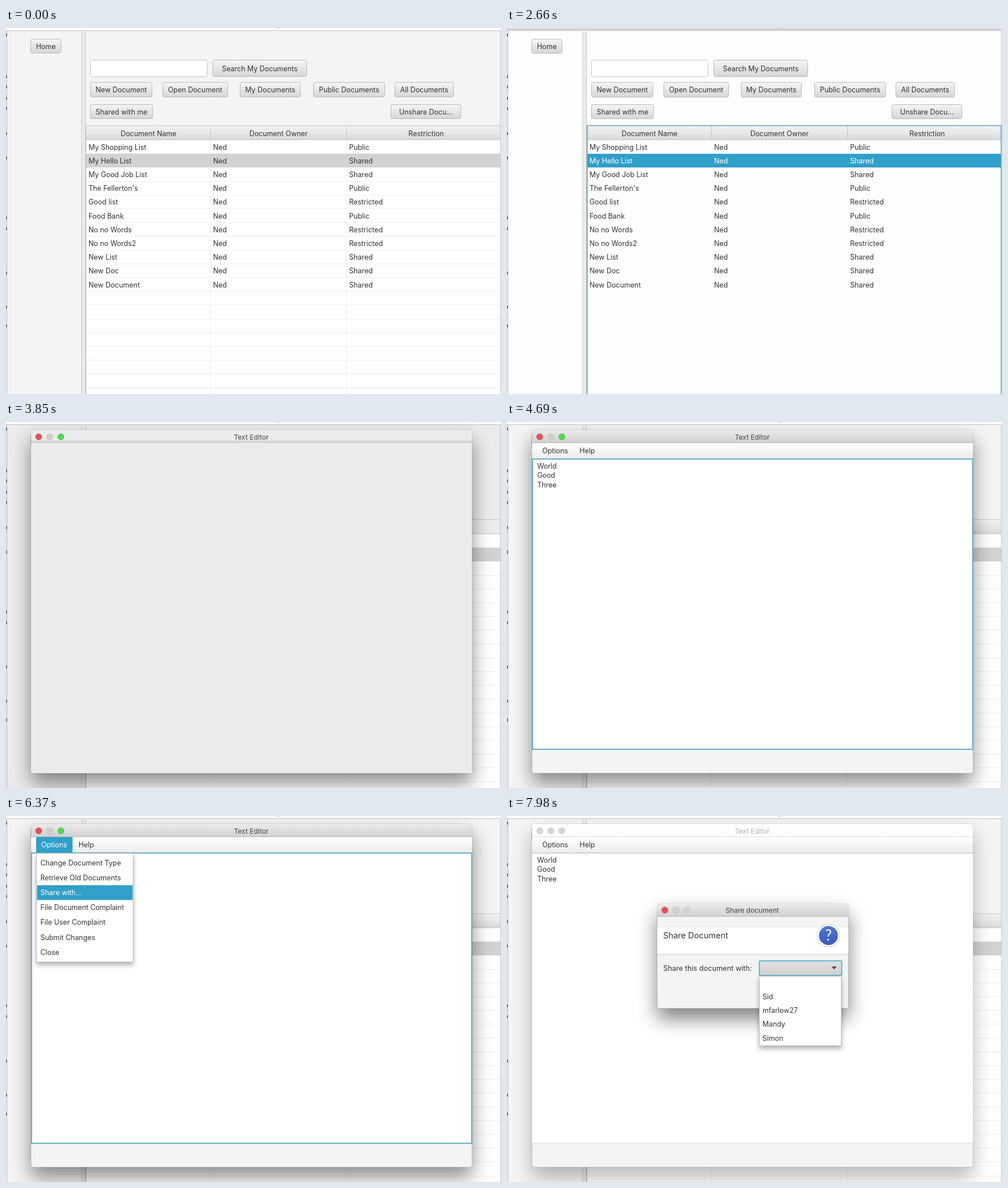
Animation, 870 px wide and 643 px high, one loop 8 s. Source, as an HTML page:

```html
<!DOCTYPE html>
<html lang="en">
<head>
<meta charset="utf-8">
<title>Sharing a document</title>
<style>
  html, body { margin: 0; width: 100%; height: 100%; overflow: hidden; background: #f4f4f4; }
  svg { display: block; width: 100%; height: 100%; }
  text { font-family: Inter, Roboto, sans-serif; font-size: 12.4px; fill: #333; white-space: pre; }
  .title { font-size: 12.1px; fill: #444; }
  .heading { font-size: 14.5px; }
  .prompt { font-size: 12.7px; }
  .white text, text.white { fill: #fff; }
  #selected text { fill: inherit; }
  .window { transform-box: fill-box; transform-origin: center; }
</style>
</head>
<body>
<svg id="stage" viewBox="0 0 870 643" preserveAspectRatio="none"></svg>
<script>
const LOOP = 8000;
const BLUE = '#309fc9';

// Moments of the story, in ms
const T = {
  focus: 2310, editor: 3480, content: 3900,
  menu: 5320, hover: [5600, 5780, 5950], menuClose: 6400,
  dialog: 6500, dialogContent: 6760, dropdown: 7500
};

// Drawing helpers
const rect = (x, y, w, h, fill, extra = '') =>
  `<rect x="${x}" y="${y}" width="${w}" height="${h}" fill="${fill}" ${extra}/>`;
const line = (x1, y1, x2, y2, color, width = 1) =>
  `<path d="M${x1} ${y1}L${x2} ${y2}" stroke="${color}" stroke-width="${width}"/>`;
const label = (x, middle, text, cls = '', anchor = 'start') =>
  `<text x="${x}" y="${middle + 4.5}" class="${cls}" text-anchor="${anchor}">${text}</text>`;
const centered = (x, middle, text, cls) => label(x, middle, text, cls, 'middle');
const group = (id, content, cls = '') => `<g id="${id}" class="${cls}">${content}</g>`;
const button = (x, y, w, h, text) =>
  rect(x + 1, y + 1.5, w - 1, h, '#fff', 'rx="3"') +
  rect(x + .5, y + .5, w - 1, h - 1, 'url(#button)', 'rx="3" stroke="#b9b9b9"') +
  centered(x + w / 2, y + h / 2, text);
const lights = (x, y, colors) => colors.map((color, i) =>
  `<circle cx="${x + i * 19.5}" cy="${y}" r="5.8" fill="${color}" stroke="#000" stroke-opacity=".08"/>`).join('');
const shadow = (id, x, y, w, h, opacity) =>
  rect(x, y + 18, w, h, '#000', `id="${id}" rx="6" opacity="${opacity}" filter="url(#blur)"`);
const popup = (x, y, w, h) =>
  rect(x, y + 5, w, h, '#000', 'opacity=".3" filter="url(#softBlur)"') +
  rect(x + .5, y + .5, w - 1, h - 1, '#fff', 'stroke="#bcbcbc"');
const topRounded = (x, y, w, h, r) =>
  `M${x} ${y + h}V${y + r}q0 ${-r} ${r} ${-r}H${x + w - r}q${r} 0 ${r} ${r}V${y + h}z`;
const gradient = (id, ...colors) =>
  `<linearGradient id="${id}" x2="0" y2="1">${colors.map((color, i) =>
    `<stop offset="${i / (colors.length - 1)}" stop-color="${color}"/>`).join('')}</linearGradient>`;

const defs = `<defs>
  ${gradient('button', '#f5f5f5', '#e6e6e6', '#d6d6d6')}
  ${gradient('header', '#f1f1f1', '#e8e8e8', '#d9d9d9')}
  ${gradient('bar', '#ebebeb', '#d1d1d1')}
  ${gradient('menuBar', '#ffffff', '#ececec')}
  ${gradient('combo', '#e2e2e2', '#cfcfcf')}
  ${gradient('badge', '#4f74cf', '#3c5cbd')}
  <filter id="blur" x="-30%" y="-40%" width="160%" height="180%"><feGaussianBlur stdDeviation="17"/></filter>
  <filter id="softBlur" x="-20%" y="-20%" width="140%" height="140%"><feGaussianBlur stdDeviation="4"/></filter>
</defs>`;

// Document list
const ROW = 24.2, ROWS_TOP = 197;
const documents = [
  ['My Shopping List', 'Public'], ['My Hello List', 'Shared'], ['My Good Job List', 'Shared'],
  ["The Fellerton's", 'Public'], ['Good list', 'Restricted'], ['Food Bank', 'Public'],
  ['No no Words', 'Restricted'], ['No no Words2', 'Restricted'], ['New List', 'Shared'],
  ['New Doc', 'Shared'], ['New Document', 'Shared']
];

function documentRow([name, access], i) {
  const y = 209 + i * ROW;
  const cells = label(145, y, name) + label(364, y, 'Ned') + label(603, y, access);
  return i === 1 ? group('selected', cells) : cells;
}

function listWindow() {
  const dividers = Array.from({ length: 19 }, (_, i) => {
    const y = Math.round(ROWS_TOP + i * ROW) - .5;
    return i ? line(141, y, 869, y, '#ededed') : '';
  }).join('');
  const edgeMarks = [12, 85, 103, 123, 141, 185, 228, 333, 352, 430, 490, 523]
    .map(y => rect(0, y - 2, 1.5, 5, '#555')).join('');
  const header = rect(141, 171, 728, 25.5, 'url(#header)') +
    line(359.5, 171, 359.5, 196, '#c4c4c4') + line(598.5, 171, 598.5, 196, '#c4c4c4') +
    centered(250.5, 185, 'Document Name') + centered(479, 185, 'Document Owner') +
    centered(738.5, 185, 'Restriction');
  return rect(0, 0, 870, 643, '#f4f4f4', 'id="backdrop"') +
    rect(0, 0, 870, 4, '#fdfdfd', 'id="topStrip"') +
    line(0, 4.5, 870, 4.5, '#c2c2c2') + rect(477, 0, 3, 1, '#aaa') +
    line(1.5, 4, 1.5, 643, '#b4b4b4') + edgeMarks +
    rect(133, 6, 7, 637, '#ececec') +
    line(133, 6, 133, 643, '#c6c6c6') + line(139.5, 6, 139.5, 643, '#c0c0c0') +
    button(43, 19, 54, 26, 'Home') +
    rect(148.5, 56.5, 205, 29, '#fff', 'rx="3" stroke="#c4c4c4"') +
    button(363, 56, 166, 30, 'Search My Documents') +
    button(148, 95, 109, 27, 'New Document') +
    button(275, 95, 115, 27, 'Open Document') +
    button(411, 95, 107, 27, 'My Documents') +
    button(540, 95, 126, 27, 'Public Documents') +
    button(683, 95, 104, 27, 'All Documents') +
    button(148, 134, 110, 26, 'Shared with me') +
    button(676, 134, 124, 26, 'Unshare Docu...') +
    rect(141, 197, 728, 446, '#fff', 'id="table"') +
    group('grid', dividers + line(359.5, 197, 359.5, 643, '#f0f0f0') + line(598.5, 197, 598.5, 643, '#f0f0f0')) +
    group('tableHeader', header) +
    line(141, 171.5, 869, 171.5, '#c8c8c8') + line(141, 196.5, 869, 196.5, '#c8c8c8') +
    rect(141, 221, 728, 24, '#d2d2d2', 'id="highlight"') +
    documents.map(documentRow).join('') +
    line(140.5, 171, 140.5, 643, '#c8c8c8') + line(869, 4, 869, 643, '#c0c0c0') +
    group('tableFocus', rect(141, 171.5, 727.5, 480, 'none', 'stroke="#62a8c6" stroke-width="1.6"'));
}

// Text editor
const menuItems = ['Change Document Type', 'Retrieve Old Documents', 'Share with...',
  'File Document Complaint', 'File User Complaint', 'Submit Changes', 'Close'];
const menuY = i => 82 + i * 26.2;

function editorWindow() {
  const bar = topRounded(44, 14, 775, 22, 5);
  const active = `<path d="${bar}" fill="url(#bar)"/>` + line(44, 36.5, 819, 36.5, '#b8b8b8') +
    lights(57.5, 26, ['#e1525a', '#cfcfcf', '#52d64d']) + centered(431, 26, 'Text Editor', 'title');
  const inactive = `<path d="${bar}" fill="#fdfdfd"/>` + line(44, 36.5, 819, 36.5, '#dcdcdc') +
    lights(57.5, 26, ['#d6d6d6', '#d6d6d6', '#d6d6d6']) +
    `<g opacity=".4">${centered(431, 26, 'Text Editor', 'title')}</g>`;
  const blank = `<path d="${bar}" fill="#ebebeb"/>` + rect(44, 36, 775, 581, '#ebebeb', 'rx="3"') +
    rect(44, 32.5, 775, 2.5, '#d8d8d8') + line(44, 36, 819, 36, '#bdbdbd') +
    lights(57.5, 26, ['#e1525a', '#cfcfcf', '#52d64d']) + centered(431, 26, 'Text Editor', 'title');
  const content = rect(44, 37, 775, 27, 'url(#menuBar)') +
    label(62, 50, 'Options') + label(127.5, 50, 'Help') +
    rect(44, 64, 775, 512, '#fff') + line(44, 65, 819, 65, '#a9a9a9') + line(44, 575, 819, 575, '#cfcfcf') +
    ['World', 'Good', 'Three'].map((word, i) => label(53, 77 + i * 16.6, word)).join('') +
    group('editorFocus', rect(45, 65, 773.5, 510, 'none', 'stroke="#58a9c7" stroke-width="1.8"'));
  const menu = rect(53, 37, 64, 27, BLUE) + label(62, 50, 'Options', 'white') + popup(53, 65, 171, 192) +
    menuItems.map((item, i) => label(60.5, menuY(i), item)).join('') +
    T.hover.map((_, i) => group('hover' + i,
      rect(54.5, menuY(i) - 12.8, 168, 26, BLUE) + label(60.5, menuY(i), menuItems[i], 'white'))).join('');
  return group('editor',
    shadow('editorShadow', 44, 14, 775, 603, .45) +
    rect(44, 14, 775, 603, '#f4f4f4', 'rx="4" stroke="#000" stroke-opacity=".15"') +
    group('activeBar', active) + group('inactiveBar', inactive) +
    group('editorContent', content) + group('blankEditor', blank) + group('menu', menu), 'window');
}

// Share dialog
function shareDialog() {
  const content = rect(264, 196, 336, 47, '#fff') + line(264, 243, 600, 243, '#cbcbcb') +
    label(274.5, 210.5, 'Share Document', 'heading') +
    '<circle cx="565" cy="210" r="20" fill="#fff" stroke="#c9c9c9"/>' +
    '<circle cx="565" cy="210" r="16.7" fill="url(#badge)"/>' +
    '<text x="565" y="219" class="white" text-anchor="middle" style="font:26px Lato,sans-serif">?</text>' +
    label(274.5, 267, 'Share this document with:', 'prompt') +
    button(446, 300, 66, 26, 'Cancel') + button(522, 300, 66, 26, 'OK') +
    rect(443.5, 254.5, 145, 26, 'url(#combo)', 'rx="2.5" stroke="#55b3d0" stroke-width="1.8"') +
    '<path d="M570.5 264.5h9l-4.5 5z" fill="#444"/>';
  const names = ['Sid', 'mfarlow27', 'Mandy', 'Simon'];
  const dropdown = popup(443, 281, 145, 123) +
    names.map((name, i) => label(449, 317.5 + i * 24.2, name)).join('');
  return group('dialog',
    shadow('dialogShadow', 264, 154, 336, 184, .5) +
    rect(264, 154, 336, 184, '#f4f4f4', 'rx="4" stroke="#000" stroke-opacity=".15"') +
    `<path d="${topRounded(264, 154, 336, 22, 5)}" fill="url(#bar)"/>` +
    line(264, 176.5, 600, 176.5, '#bdbdbd') +
    lights(277.5, 165.3, ['#e1525a', '#d3d3d3', '#d3d3d3']) + centered(431, 165.3, 'Share document', 'title') +
    group('dialogContent', content), 'window') +
    group('dropdown', dropdown);
}

document.getElementById('stage').innerHTML = defs + listWindow() + editorWindow() + shareDialog();

// Motion helpers
const timing = { duration: LOOP, iterations: Infinity };
const byId = id => document.getElementById(id);

function steps(id, property, table) {
  const frames = table.map(([ms, value]) => ({ offset: ms / LOOP, [property]: value, easing: 'step-end' }));
  frames.push({ offset: 1, [property]: table[table.length - 1][1] });
  byId(id).animate(frames, timing);
}

function show(id, from, to = LOOP) {
  const table = [[0, from ? 0 : 1]];
  if (from) table.push([from, 1]);
  if (to < LOOP) table.push([to, 0]);
  steps(id, 'opacity', table);
}

function zoomIn(id, start, length = 210) {
  const hidden = { opacity: 0, transform: 'scale(.7)' };
  const shown = { opacity: 1, transform: 'scale(1)' };
  byId(id).animate([
    { ...hidden, offset: 0, easing: 'step-end' },
    { ...hidden, offset: start / LOOP, easing: 'ease-out' },
    { ...shown, offset: (start + length) / LOOP },
    { ...shown, offset: 1 }
  ], timing);
}

const whileFocused = (normal, focused) => [[0, normal], [T.focus, focused], [T.editor, normal]];

steps('backdrop', 'fill', [[0, '#f4f4f4'], [T.focus, '#fcfefd'], [T.editor, '#ebebeb'], [T.content, '#f4f4f4']]);
steps('topStrip', 'fill', whileFocused('#fdfdfd', '#d8d8d8'));
steps('table', 'fill', whileFocused('#ffffff', '#fcfefd'));
steps('highlight', 'fill', whileFocused('#d2d2d2', BLUE));
steps('selected', 'fill', whileFocused('#333333', '#ffffff'));
steps('grid', 'opacity', whileFocused(1, 0));
steps('tableHeader', 'opacity', [[0, 1], [T.editor + 210, 0], [T.content, 1]]);
show('tableFocus', T.focus, T.editor);

zoomIn('editor', T.editor);
show('blankEditor', 0, T.content);
show('editorContent', T.content);
show('menu', T.menu, T.menuClose);
T.hover.forEach((start, i) => show('hover' + i, start, T.hover[i + 1]));
show('activeBar', 0, T.dialog);
show('inactiveBar', T.dialog);
show('editorFocus', 0, T.dialog);
steps('editorShadow', 'opacity', [[0, .45], [T.dialog, .28]]);

zoomIn('dialog', T.dialog);
show('dialogContent', T.dialogContent);
show('dropdown', T.dropdown);
</script>
</body>
</html>
```
